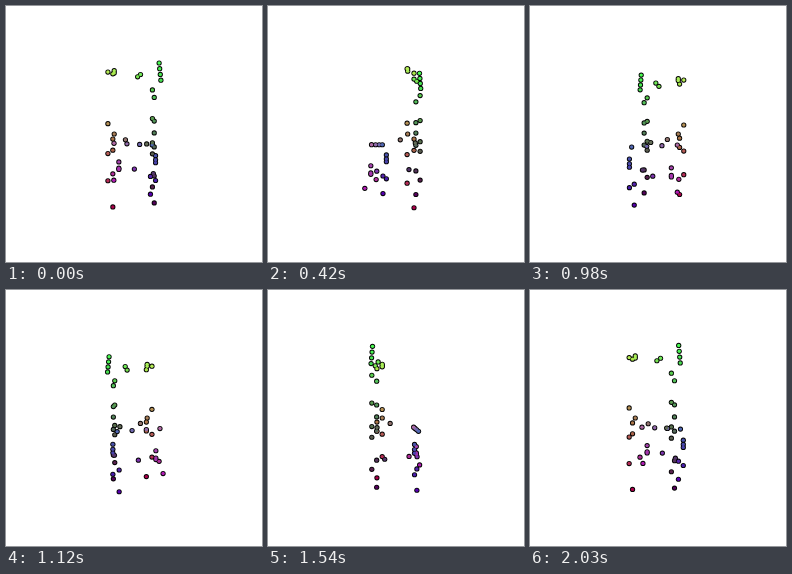
These frames come from a looping animation (256 px wide and 256 px high, 2.1 s). An HTML page with a canvas:

```html
<!DOCTYPE html>
<html>
<head>
<meta charset="utf-8">
<style>
  html, body { margin: 0; width: 100%; height: 100%; overflow: hidden; background: #fff; }
  canvas { display: block; }
</style>
</head>
<body>
<canvas id="stage" width="256" height="256"></canvas>
<script>
const ctx = document.getElementById('stage').getContext('2d');
const LOOP = 2100, STEP = 70;
const CENTER = 128, EYE = 225;
const dots = [];

// x to the right, y down, z towards the viewer; the place in the box sets the colour
function dot(x, y, z) {
  const rgb = [x * 2.3, y * 1.93, z * 2.3].map(v => Math.round(127 - v));
  dots.push({ x, y, z, color: `rgb(${rgb})` });
}

function post(x, z, ...heights) {
  for (const y of heights) dot(x, y, z);
}

function rail(n, from, to) {
  for (let i = 0; i < n; i++) {
    dot(...from.map((v, k) => v + (to[k] - v) * i / (n - 1)));
  }
}

// Front right
rail(4, [23, -65, 19], [24.5, -49, 20]);
post(16.7, 21, -40, -14, 8, 18, 48);
post(18.8, 16, -34, -12, -1, 12, 39, 64);
post(18.6, 8.5, 38);
// Front left
post(-24, 18, -57, -9.5, 18, 43);
post(-19, 23, -54, 4.5, 14.5, 65.5);
post(-18.3, 17, -58.5, -56.5, 0);
// Links across the front
rail(2, [6, -55, 17], [3.3, -52, 20.4]);
rail(2, [-8.3, 5.6, 7], [11.7, 9.2, 17]);
// Back
rail(4, [-21.5, 10, -17], [20, 12, -22.5]);
post(23.4, -19, 23.5, 28, 31.2, 50.4);
post(18, -21, 46.4, 65.8);
post(0.4, -21, 38.3);
post(-16.5, -20, 30.4, 37.2, 38.6);
rail(2, [-22.3, 42, -12], [-22.3, 51, -23.5]);

function project({ x, y, z, color }, angle) {
  const c = Math.cos(angle), s = Math.sin(angle);
  const depth = z * c - x * s;
  const scale = EYE / (EYE - depth);
  return { x: CENTER + scale * (x * c + z * s), y: CENTER + scale * y, depth, color };
}

function disc(x, y, r, color) {
  ctx.fillStyle = color;
  ctx.beginPath();
  ctx.arc(x, y, r, 0, 2 * Math.PI);
  ctx.fill();
}

function draw(now) {
  const t = Math.floor(now % LOOP / STEP) * STEP;
  const angle = t / LOOP * 2 * Math.PI;
  ctx.clearRect(0, 0, 256, 256);
  const view = dots.map(d => project(d, angle)).sort((a, b) => a.depth - b.depth);
  // All rims first, so that touching dots share one outline
  for (const d of view) disc(d.x, d.y, 2.6, '#000');
  for (const d of view) disc(d.x, d.y, 1.7, d.color);
}

const start = performance.now();
function tick() {
  draw(performance.now() - start);
  requestAnimationFrame(tick);
}
tick();
</script>
</body>
</html>
```
